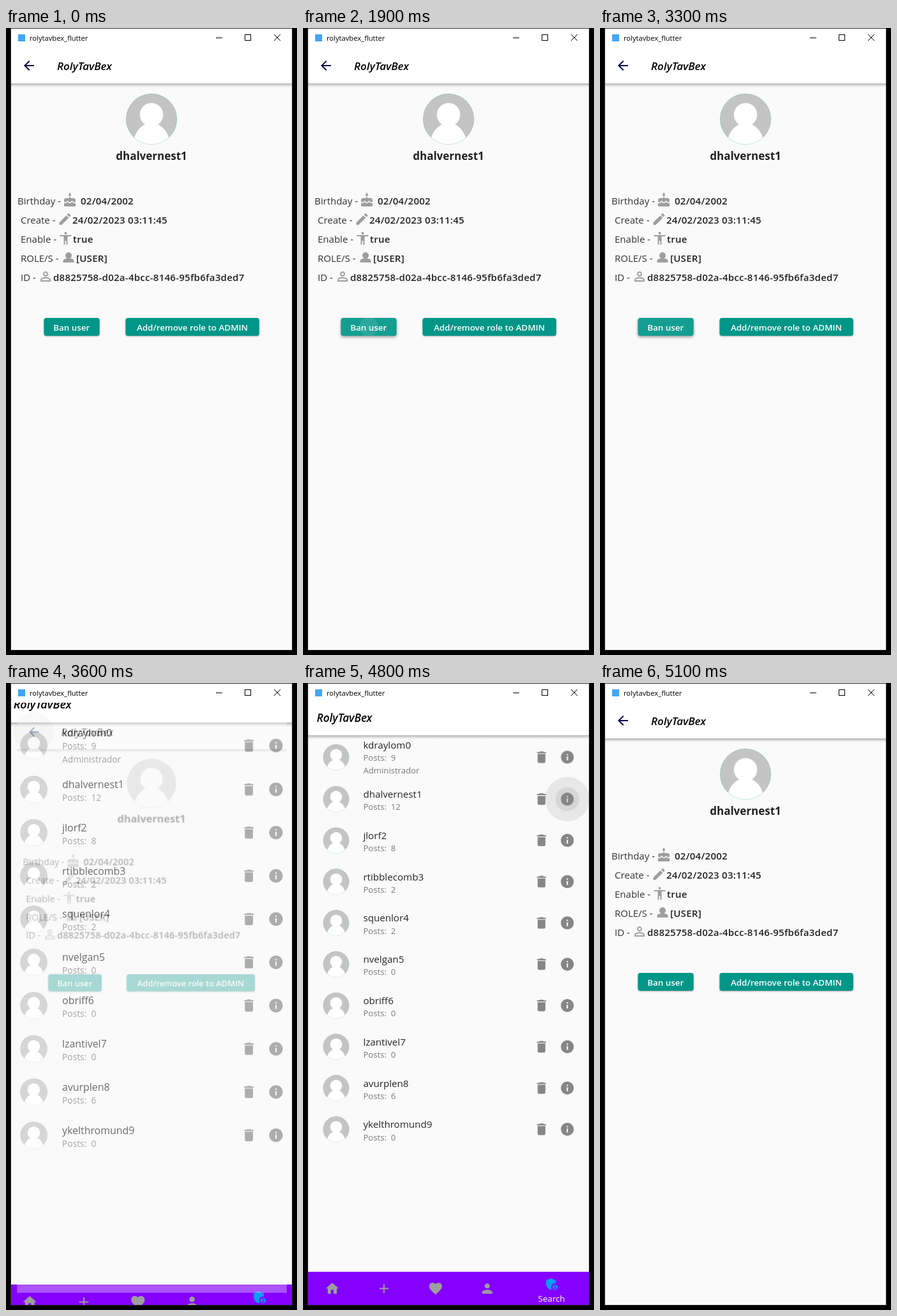
Recreate the animation shown at these times as an HTML page. Size 456 by 984 pixels, loop 7.6 s.

```html
<!DOCTYPE html>
<html lang="en">
<head>
<meta charset="utf-8">
<title>User admin</title>
<style>
html, body { margin: 0; width: 100%; height: 100%; overflow: hidden; background: #000; }
svg { display: block; width: 456px; height: 984px; font-family: "Open Sans", "Noto Sans", sans-serif; }
text { white-space: pre; }
.brand { font: italic 600 17px "Open Sans", "Noto Sans", sans-serif; fill: #000; }
.label { font-size: 15px; fill: #333; }
.value { font-size: 15px; font-weight: 600; letter-spacing: .27px; fill: #212121; }
.name { font-size: 15px; fill: #262626; }
.sub { font-size: 13px; fill: #7a7a7a; }
.btn { font-size: 13.4px; font-weight: 600; fill: #fff; text-anchor: middle; }
.teal { fill: #009688; filter: drop-shadow(0 1px 1px rgba(0,0,0,.34)); }
.grey { fill: #9e9e9e; }

.page, .scrim, .move { animation: 7.6s step-end infinite; }
.page { transform-origin: 228px 503.5px; }
#list { animation-name: list; }
#profile { animation-name: profile; }
.scrim { animation-name: scrim; }
.lift { animation-name: lift; }
.hover { animation-name: hover; }
.splash { animation-name: splash; transform-origin: 103px 469px; }
.tip { animation-name: tip; }
.backInk { animation-name: backInk; }
.infoInk { animation-name: infoInk; transform-origin: 412px 186px; }

@keyframes list {
  0% { transform: none; }
  47.36% { transform: scale(1.06); }
  48.68% { transform: scale(1.013); }
  50% { transform: scale(1.002); }
  51.31% { transform: none; }
  63.15% { transform: scale(1.012); }
  64.47% { transform: scale(1.043); }
  65.78% { transform: scale(1.049); }
  67.1%, 100% { transform: none; }
}
@keyframes profile {
  0% { transform: none; opacity: 1; }
  47.36% { transform: scale(.96); opacity: .33; }
  48.68% { transform: scale(.92); opacity: 0; }
  64.47% { transform: scale(.98); opacity: 1; }
  65.78% { transform: scale(.997); opacity: 1; }
  67.1%, 100% { transform: none; opacity: 1; }
}
@keyframes scrim {
  0% { opacity: 0; }
  64.47% { opacity: .6; }
  67.1%, 100% { opacity: 0; }
}
@keyframes lift {
  0% { filter: drop-shadow(0 1px 1px rgba(0,0,0,.34)); }
  9.21% { filter: drop-shadow(0 1.4px 1.4px rgba(0,0,0,.36)); }
  10.52% { filter: drop-shadow(0 1.8px 1.7px rgba(0,0,0,.38)); }
  11.84% { filter: drop-shadow(0 2.2px 2px rgba(0,0,0,.4)); }
  47.36%, 100% { filter: drop-shadow(0 1px 1px rgba(0,0,0,.34)); }
}
@keyframes hover {
  0% { opacity: 0; }
  9.21% { opacity: .027; }
  10.52% { opacity: .055; }
  11.84% { opacity: .08; }
  47.36%, 100% { opacity: 0; }
}
@keyframes splash {
  0% { transform: scale(0); opacity: 0; }
  25% { transform: scale(.25); opacity: .1; }
  26.31% { transform: scale(.5); opacity: .12; }
  27.63% { transform: scale(.75); opacity: .11; }
  28.94% { transform: none; opacity: .08; }
  30.26% { transform: none; opacity: .04; }
  31.57% { transform: none; opacity: .02; }
  32.89%, 100% { transform: none; opacity: 0; }
}
@keyframes tip {
  0% { opacity: 0; }
  36.84% { opacity: .5; }
  38.15% { opacity: 1; }
  43.42%, 100% { opacity: 0; }
}
@keyframes backInk {
  0% { opacity: 0; }
  47.36% { opacity: .08; }
  48.68%, 100% { opacity: 0; }
}
@keyframes infoInk {
  0% { transform: scale(0); opacity: 0; }
  61.84% { transform: scale(.5); opacity: .6; }
  63.15% { transform: none; opacity: 1; }
  64.47%, 100% { transform: scale(0); opacity: 0; }
}
</style>
</head>
<body>
<svg viewBox="0 0 456 984">
  <defs>
    <clipPath id="client"><rect x="8" y="31" width="440" height="945"/></clipPath>
    <clipPath id="banShape"><rect x="59.4" y="455" width="87.2" height="28" rx="4"/></clipPath>
    <clipPath id="disc"><circle r="40"/></clipPath>
    <linearGradient id="fall" x2="0" y2="1">
      <stop stop-opacity=".3"/><stop offset=".5" stop-opacity=".12"/><stop offset="1" stop-opacity="0"/>
    </linearGradient>

    <g id="avatar">
      <g clip-path="url(#disc)">
        <circle r="40" fill="#c4c4c4"/>
        <ellipse cy="42" rx="29" ry="36" fill="#fff"/>
        <circle cy="-7" r="18.3" fill="#fff"/>
      </g>
      <circle r="39.8" fill="none" stroke="#009688" stroke-width=".7" opacity=".3"/>
    </g>
    <g id="bar">
      <rect x="8" y="87" width="440" height="6" fill="url(#fall)"/>
      <rect x="8" y="31" width="440" height="56" fill="#fff"/>
    </g>

    <path id="back" d="M20 11H7.83l5.59-5.59L12 4l-8 8 8 8 1.41-1.41L7.83 13H20v-2z"/>
    <path id="cake" d="M12 6c1.11 0 2-.9 2-2 0-.38-.1-.73-.29-1.03L12 0l-1.71 2.97c-.19.3-.29.65-.29 1.03 0 1.1.9 2 2 2zm4.6 9.99l-1.07-1.07-1.08 1.07c-1.3 1.3-3.58 1.31-4.89 0l-1.07-1.07-1.09 1.07C6.75 16.64 5.88 17 4.96 17c-.73 0-1.4-.23-1.96-.61V21c0 .55.45 1 1 1h16c.55 0 1-.45 1-1v-4.61c-.56.38-1.23.61-1.96.61-.92 0-1.79-.36-2.44-1.01zM18 9h-5V7h-2v2H6c-1.66 0-3 1.34-3 3v1.54c0 1.08.88 1.96 1.96 1.96.52 0 1.02-.2 1.38-.57l2.14-2.13 2.13 2.13c.74.74 2.03.74 2.77 0l2.14-2.13 2.13 2.13c.37.37.86.57 1.38.57 1.08 0 1.96-.88 1.96-1.96V12C21 10.34 19.66 9 18 9z"/>
    <path id="pen" d="M3 17.25V21h3.75L17.81 9.94l-3.75-3.75L3 17.25zM20.71 7.04c.39-.39.39-1.02 0-1.41l-2.34-2.34c-.39-.39-1.02-.39-1.41 0l-1.83 1.83 3.75 3.75 1.83-1.83z"/>
    <path id="body" d="M12 2c1.1 0 2 .9 2 2s-.9 2-2 2-2-.9-2-2 .9-2 2-2zm9 7h-6v13h-2v-6h-2v6H9V9H3V7h18v2z"/>
    <path id="person" d="M12 12c2.21 0 4-1.79 4-4s-1.79-4-4-4-4 1.79-4 4 1.79 4 4 4zm0 2c-2.67 0-8 1.34-8 4v2h16v-2c0-2.66-5.33-4-8-4z"/>
    <path id="bust" d="M12 4a5 5 0 0 1 0 10a5 5 0 0 1 0-10zM3.500 20v-2.500c0-2.500 4-4.200 8.500-4.200s8.500 1.700 8.500 4.200V20z"/>
    <path id="outline" d="M12 5.9a2.1 2.1 0 1 1 0 4.2a2.1 2.1 0 1 1 0-4.2m0 9c2.97 0 6.1 1.46 6.1 2.1v1.1H5.9V17c0-.64 3.13-2.1 6.1-2.1M12 4C9.79 4 8 5.79 8 8s1.79 4 4 4 4-1.79 4-4-1.79-4-4-4zm0 9c-2.67 0-8 1.34-8 4v3h16v-3c0-2.66-5.33-4-8-4z" fill-rule="evenodd"/>
    <path id="home" d="M10 20v-6h4v6h5v-8h3L12 3 2 12h3v8z"/>
    <path id="add" d="M19 13h-6v6h-2v-6H5v-2h6V5h2v6h6v2z"/>
    <path id="heart" d="M12 21.35l-1.45-1.32C5.4 15.36 2 12.28 2 8.5 2 5.42 4.42 3 7.5 3c1.74 0 3.41.81 4.5 2.09C13.09 3.81 14.76 3 16.5 3 19.58 3 22 5.42 22 8.5c0 3.78-3.4 6.86-8.55 11.54L12 21.35z"/>
    <path id="shield" fill-rule="evenodd" d="M17 11c.34 0 .67.04 1 .09V6.27L10.5 3 3 6.27v4.91c0 4.54 3.2 8.79 7.5 9.82.55-.13 1.08-.32 1.6-.55-.69-.98-1.1-2.17-1.1-3.45 0-3.31 2.69-6 6-6zM17 13c-2.21 0-4 1.79-4 4s1.79 4 4 4 4-1.79 4-4-1.79-4-4-4zm0 1.38c.62 0 1.12.51 1.12 1.12s-.51 1.12-1.12 1.12-1.12-.51-1.12-1.12.5-1.12 1.12-1.12zm0 5.37c-.93 0-1.74-.46-2.24-1.17.05-.72 1.51-1.08 2.24-1.08s2.19.36 2.24 1.08c-.5.71-1.31 1.17-2.24 1.17z"/>
    <path id="bin" d="M6 19c0 1.1.9 2 2 2h8c1.1 0 2-.9 2-2V7H6v12zM19 4h-3.5l-1-1h-5l-1 1H5v2h14V4z"/>
    <path id="info" fill-rule="evenodd" d="M12 2C6.48 2 2 6.48 2 12s4.48 10 10 10 10-4.48 10-10S17.52 2 12 2zm1 15h-2v-6h2v6zm0-8h-2V7h2v2z"/>
  </defs>

  <rect width="456" height="984"/>
  <rect x="7" y="0" width="442" height="977" fill="#2b2b2b"/>
  <rect x="8" y="1" width="440" height="975" fill="#fff"/>

  <g clip-path="url(#client)">
    <g id="list" class="page">
      <rect x="8" y="31" width="440" height="945" fill="#fafafa"/>
      <use href="#bar"/>
      <text class="brand" x="24" y="66">RolyTavBex</text>
      <g class="move infoInk">
        <circle cx="412" cy="186" r="34.5" opacity=".075"/>
        <circle cx="412" cy="186" r="18.5" opacity=".07"/>
      </g>
      <g id="rows"></g>
      <rect x="8" y="919" width="440" height="57" fill="#8400ff"/>
      <g class="grey">
        <use href="#home" x="36" y="933"/>
        <use href="#add" x="116" y="933"/>
        <use href="#heart" x="196" y="933"/>
        <use href="#person" x="276" y="933"/>
      </g>
      <use href="#shield" x="376" y="926" fill="#0a9cf5"/>
      <text x="387.5" y="965" font-size="13.3" fill="#fff" text-anchor="middle">Search</text>
    </g>

    <rect class="scrim" x="8" y="31" width="440" height="945"/>

    <g id="profile" class="page">
      <rect x="8" y="31" width="440" height="945" fill="#fafafa"/>
      <use href="#bar"/>
      <circle class="move backInk" cx="36" cy="59" r="33"/>
      <use href="#back" x="24" y="47" fill="#08084a"/>
      <text class="brand" x="80" y="66">RolyTavBex</text>
      <use href="#avatar" x="228" y="143"/>
      <text x="228" y="207" font-size="17" font-weight="700" fill="#212121" text-anchor="middle">dhalvernest1</text>

      <g class="label">
        <text x="18" y="277">Birthday -</text>
        <text x="23" y="307">Create -</text>
        <text x="23" y="337">Enable -</text>
        <text x="23" y="367">ROLE/S -</text>
        <text x="23" y="397">ID -</text>
      </g>
      <g class="grey">
        <use href="#cake" x="88" y="258"/>
        <use href="#pen" x="80.5" y="288"/>
        <use href="#body" x="81.5" y="318"/>
        <use href="#bust" x="86" y="348"/>
        <use href="#outline" x="50" y="378"/>
      </g>
      <g class="value">
        <text x="117" y="277">02/04/2002</text>
        <text x="104" y="307">24/02/2023 03:11:45</text>
        <text x="105" y="337">true</text>
        <text x="110" y="367">[USER]</text>
        <text x="74" y="397">d8825758-d02a-4bcc-8146-95fb6fa3ded7</text>
      </g>

      <rect class="teal move lift" x="59.4" y="455" width="87.2" height="28" rx="4"/>
      <g clip-path="url(#banShape)" fill="#fff">
        <rect class="move hover" x="59" y="455" width="88" height="28"/>
        <circle class="move splash" cx="103" cy="469" r="60"/>
      </g>
      <text class="btn" x="102.7" y="475">Ban user</text>
      <rect class="teal" x="187.4" y="455" width="209.4" height="28" rx="4"/>
      <text class="btn" x="292" y="475">Add/remove role to ADMIN</text>

      <g class="move tip">
        <rect x="18" y="83" width="41" height="24" rx="4" fill="#616161" fill-opacity=".9"/>
        <text x="38.5" y="98.5" font-size="10" fill="#fff" text-anchor="middle">Back</text>
      </g>
    </g>
  </g>

  <rect x="19" y="10" width="11" height="11" fill="#42a5f5"/>
  <text x="37" y="20" font-size="11.2" fill="#000">rolytavbex_flutter</text>
  <g fill="none" stroke="#000">
    <path d="M329 15.5h10M374.5 10.5h9v9h-9z" shape-rendering="crispEdges"/>
    <path d="M420 10l10 10m0-10l-10 10"/>
  </g>
</svg>
<script>
const users = [
  ["kdraylom0", 9], ["dhalvernest1", 12], ["jlorf2", 8], ["rtibblecomb3", 2], ["squenlor4", 2],
  ["nvelgan5", 0], ["obriff6", 0], ["lzantivel7", 0], ["avurplen8", 6], ["ykelthromund9", 0]
];

// The first row is taller: it carries a third line with the role.
const row = ([name, posts], i) => {
  const mid = i ? 122 + 64 * i : 121;
  const base = i ? mid - 2 : 108;
  const role = i ? "" : `<text class="sub" x="96" y="${base + 38}">Administrador</text>`;
  return `
    <use href="#avatar" transform="translate(54 ${mid}) scale(.505)"/>
    <text class="name" x="96" y="${base}">${name}</text>
    <text class="sub" x="96" y="${base + 19}">Posts:  ${posts}</text>${role}
    <g fill="#868686">
      <use href="#bin" x="360" y="${mid - 12}"/>
      <use href="#info" x="400" y="${mid - 12}"/>
    </g>`;
};
document.getElementById("rows").innerHTML = users.map(row).join("");
</script>
</body>
</html>
```
